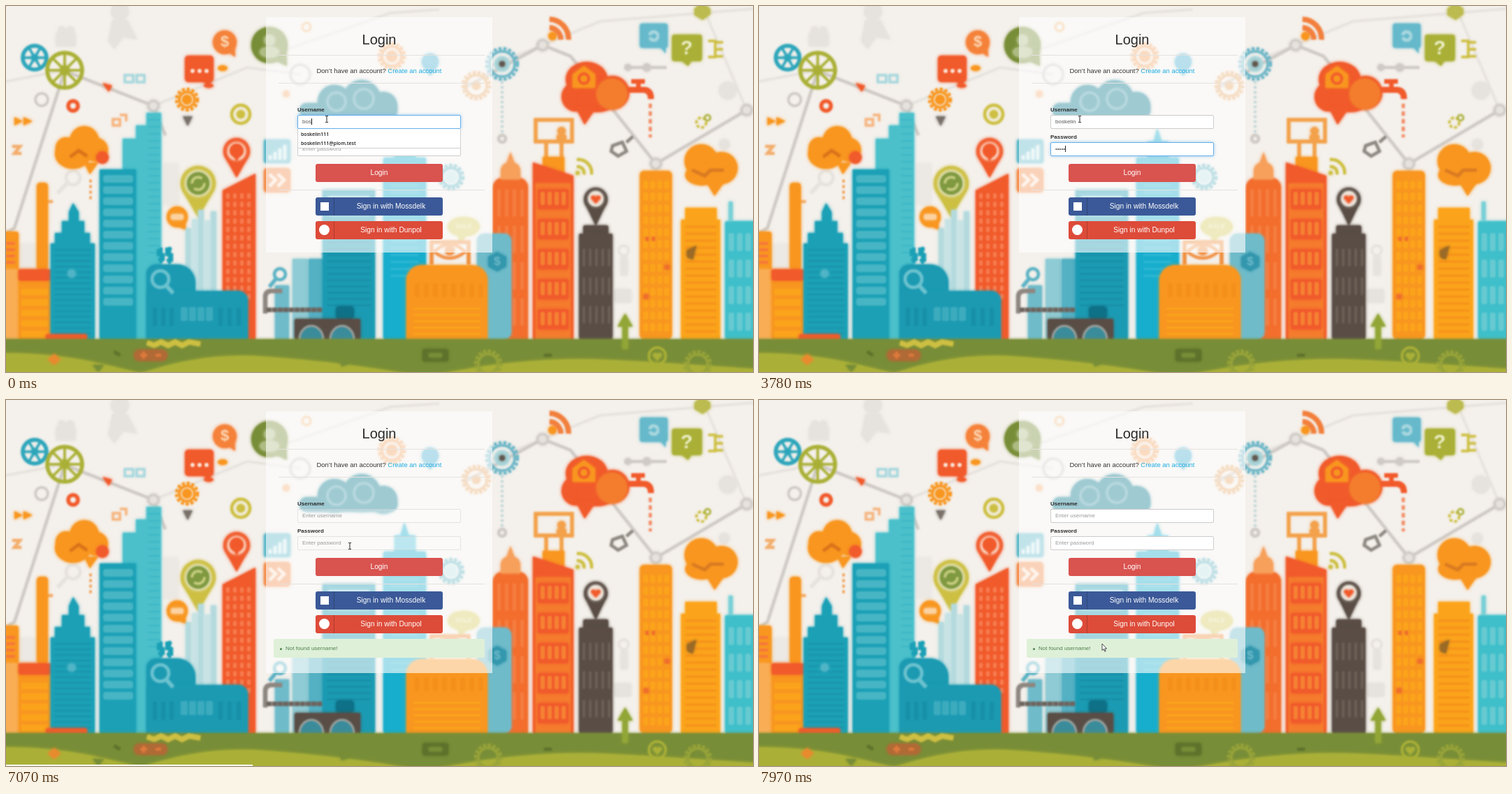
An HTML page with a canvas that plays this animation: 1069 px wide and 524 px high, repeating every 8000 ms.

```html
<!DOCTYPE html>
<html lang="en">
<head>
<meta charset="utf-8">
<title>Login</title>
<style>
  html, body { margin: 0; width: 100%; height: 100%; overflow: hidden; background: #f4f0eb; }
  body { position: relative; font: 8px/10px "Liberation Sans", Arial, sans-serif; color: #333; }
  body *, #city { box-sizing: border-box; }
  #city { position: absolute; left: -10px; top: -10px; filter: blur(1.2px); }
  .card, .card > *, #bar, #mouse { position: absolute; }
  .card { left: 372px; top: 16px; width: 324px; height: 337px; background: rgba(255,255,255,.61); white-space: nowrap; }
  .card.tall { height: 375px; }
  h1 { left: 0; right: 0; top: 20px; margin: 0; text-align: center; font: 20px/24px "Liberation Sans", Arial, sans-serif; color: #2b2b2b; }
  hr { left: 18px; width: 295px; height: 1px; margin: 0; border: 0; background: #e5e2df; }
  .join { left: 0; right: 0; top: 71px; text-align: center; font-size: 9.45px; line-height: 12px; }
  .join span { color: #1cabe2; }
  label { left: 45px; font-weight: bold; color: #2d2d2d; }
  .field { left: 45px; width: 234px; height: 20px; padding: 4px 6px; border: 1px solid #ccc; border-radius: 2px; background: #fff; color: #555; }
  .hint { color: #999; }
  .caret { display: inline-block; width: 0; height: 9px; margin-right: -1px; border-left: 1px solid #222; vertical-align: top; }
  .btn { left: 71px; width: 182px; height: 26px; border-radius: 3px; color: #fff; font-size: 10.25px; line-height: 25px; text-align: center; }
  .social { padding-left: 34px; }
  .social::before { content: ""; position: absolute; left: 0; top: 0; width: 26px; height: 26px; border-right: 1px solid rgba(0,0,0,.2); }
  .social i { position: absolute; left: 7px; top: 7px; width: 12px; height: 12px; background: #fff; }
  .social i.dot { left: 5px; top: 5px; width: 15px; height: 15px; border-radius: 50%; }
  #menu { left: 45px; top: 160px; width: 234px; height: 28px; padding: 1px 0 0 4px; background: #fff; border: 1px solid #d0d0d0; border-top: 0; font: 600 7px/13.3px "Open Sans", "Noto Sans", sans-serif; color: #1c1c1c; }
  #alert { left: 11px; top: 326px; width: 302px; height: 27px; border-radius: 2px; background: #dff0d8; color: #4d804e; line-height: 27px; padding-left: 17px; }
  #alert::before { content: ""; position: absolute; left: 9px; top: 13px; width: 3px; height: 3px; border-radius: 50%; background: #4d804e; }
  #bar { left: 0; top: 522px; width: 353px; height: 2px; background: #fdfdfd; }
  #mouse { left: 0; top: 0; width: 20px; height: 20px; overflow: visible; }
</style>
</head>
<body>
<canvas id="city" width="1089" height="544"></canvas>
<div class="card" id="card">
  <h1>Login</h1>
  <hr style="top:54px"><hr style="top:94px"><hr style="top:247px">
  <div class="join">Don’t have an account? <span>Create an account</span></div>
  <label style="top:128px">Username</label>
  <div class="field" id="user" style="top:140px"></div>
  <label style="top:167px">Password</label>
  <div class="field" id="pass" style="top:179px"></div>
  <div id="menu">boskelin111<br>boskelin111@plom.test</div>
  <div class="btn" style="top:210px;background:#d9534f">Login</div>
  <div class="btn social" id="blue" style="top:258px"><i></i>Sign in with Mossdelk</div>
  <div class="btn social" id="red" style="top:292px"><i class="dot"></i>Sign in with Dunpol</div>
  <div id="alert">Not found username!</div>
</div>
<div id="bar"></div>
<svg id="mouse">
  <path id="beam" d="M-2 -4.5H-.5L0 -4L.5 -4.5H2M0 -4V4M-2 4.5H-.5L0 4L.5 4.5H2" fill="none" stroke="#222"/>
  <path id="arrow" d="M0 0V9.5L2.2 7.5L3.7 11L5.2 10.4L3.7 7H6.6Z" fill="#fff" stroke="#222" stroke-width=".8"/>
  <path id="hand" d="M-1 1Q0 -1 1 1V4.5L5.5 5.5Q6.5 6 6 8L5 11.5H0L-3.2 7Q-3.5 5.5 -1 6.8Z" fill="#fff" stroke="#222" stroke-width=".8"/>
</svg>
<script>
const $ = id => document.getElementById(id);
const g = $('city').getContext('2d');
g.translate(10, 10);

// Drawing helpers; every shape gets a soft edge in its own colour.
const ink = (col, soft = 4) => { g.fillStyle = g.strokeStyle = g.shadowColor = col; g.shadowBlur = soft; };
const fill = (col, d) => { ink(col); g.fill(new Path2D(d)); };
const line = (col, w, d, dash = []) => { ink(col, 2); g.lineWidth = w; g.setLineDash(dash); g.stroke(new Path2D(d)); };
const box = (col, x, y, w, h, r = 1) => { ink(col); g.beginPath(); g.roundRect(x, y, w, h, r); g.fill(); };
const disc = (col, x, y, r, ry = r) => { ink(col); g.beginPath(); g.ellipse(x, y, r, ry, 0, 0, 7); g.fill(); };
const ring = (col, x, y, r, w = 3, dash = []) => { ink(col, 2); g.lineWidth = w; g.setLineDash(dash); g.beginPath(); g.arc(x, y, r, 0, 2 * Math.PI); g.stroke(); };
const gear = (col, x, y, r) => { ring(col, x, y, r, 4, [4, 3]); ring(col, x, y, r - 4, 3); };
const text = (col, x, y, size, s) => { ink(col, 0); g.font = `bold ${size}px "Liberation Sans", sans-serif`; g.textAlign = 'center'; g.textBaseline = 'middle'; g.fillText(s, x, y); };
const grid = (col, x, y, w, h, cols, rows, dx, dy, r = 1) => {
  ink(col, 0);
  for (let i = 0; i < cols * rows; i++) {
    g.beginPath(); g.roundRect(x + i % cols * dx, y + (i / cols | 0) * dy, w, h, r); g.fill();
  }
};
const pin = (col, x, y, r, tip) => { disc(col, x, y, r); fill(col, `M${x - r * .75} ${y + r * .65}L${x} ${tip}L${x + r * .75} ${y + r * .65}Z`); };
const wheel = (col, x, y, r, n) => {
  ring(col, x, y, r - 3, 5); disc(col, x, y, r / 4);
  for (let i = 0; i < n; i++) {
    const a = i / n * 2 * Math.PI;
    line(col, 3, `M${x} ${y}L${x + Math.cos(a) * (r - 3)} ${y + Math.sin(a) * (r - 3)}`);
  }
};

const teal = '#1ba0b6', aqua = '#4bc0cb', sky = '#6fbbca', orange = '#f8961f', amber = '#fba41b', red = '#f15a2b';
const gold = '#cdbf42', olive = '#aab037', leaf = '#788d37', brown = '#594d45', grey = '#cfcac5', mist = '#e6e2de';

function backdrop() {
  line(mist, 3, 'M211 143L345 88L421 98M768 56L850 22L1069 4M695 85L768 56M0 108L84 92M1060 149L1003 15M365 75L550 10L620 5');
  line(grey, 4, 'M0 325L12 318L84 93L211 143L228 185M654 118L768 56L808 72L930 226L1060 149');
  for (const [x, y] of [[211, 143], [768, 56], [930, 226], [1060, 149]]) { disc(grey, x, y, 9); disc(mist, x, y, 5); }
  box(mist, 71, 38, 29, 20, 3); disc(mist, 80, 35, 6); disc(mist, 92, 35, 6);
  disc(mist, 163, 8, 13); fill(mist, 'M152 20H174L188 48L168 45L155 62L146 50Z');
  ring(mist, 96, 246, 10, 4); line(mist, 5, 'M88 253L74 268');
  disc(mist, 1033, 121, 13); disc(mist, 1028, 198, 8);
  ring(mist, 884, 350, 7); box(mist, 879, 358, 11, 28, 3); box(mist, 870, 405, 25, 20, 4);
  box('#ece8e3', 225, 225, 22, 60); box('#ece8e3', 18, 340, 46, 36);
  ring(grey, 51, 134, 9, 3); ring(grey, 421, 98, 14, 3);
  line(grey, 4, 'M885 88H945'); disc(grey, 890, 88, 5); disc(grey, 917, 88, 6);
  line('#8f8983', 4, 'M868 200L882 195L888 208L876 215L866 208ZM888 195L897 187');
}

function icons() {
  wheel('#2fa6bb', 41, 74, 20, 6);
  wheel(olive, 84, 92, 28, 8);
  disc('#f5823a', 313, 52, 17); fill('#f5823a', 'M318 66L328 73L327 56Z'); text('#fbd9b8', 313, 52, 22, '$');
  box(red, 256, 71, 41, 38, 5); fill(red, 'M280 106L292 117L293 105Z'); grid('#fbe3d5', 264, 90, 6, 6, 3, 1, 10, 0, 3);
  disc(orange, 310, 89, 7, 4); disc(red, 290, 114, 7, 3);
  gear(orange, 259, 134, 15); disc(orange, 259, 134, 7);
  line('#a8d8de', 3, 'M170 99H182V109H170ZM187 99H198V109H187Z');
  ring(red, 96, 143, 7, 5); fill(red, 'M138 110L152 114L147 123Z');
  fill(orange, 'M12 159L24 165L12 171ZM25 159L38 165L25 171Z');
  line('#f6b580', 3, 'M153 162H163V171H153ZM163 156H172V165');
  ring(gold, 336, 155, 13, 4); disc(gold, 336, 155, 6);
  fill('#7a716b', 'M253 158H267L260 172Z');
  disc(leaf, 377, 56, 26); fill(leaf, 'M385 78L402 86L401 60Z'); disc('#aebc84', 377, 49, 8); disc('#aebc84', 377, 66, 14, 8);
  disc(orange, 96, 212, 26, 21); disc(orange, 112, 193, 21); disc(orange, 129, 206, 17); disc(orange, 86, 203, 15);
  fill(orange, 'M112 225L120 241L132 224Z'); disc(red, 138, 217, 9);
  line('#d9731b', 4, 'M92 216L104 207L116 215'); grid('#f2a55c', 119, 248, 4, 5, 1, 4, 0, 8, 2);
  pin(red, 330, 208, 19, 246); disc('#fbe2d2', 330, 208, 13); disc(red, 330, 207, 10); fill(red, 'M324 210H336L330 223Z');
  pin(gold, 275, 254, 25, 303); disc('#efe9bd', 275, 254, 19); disc('#7f9940', 275, 254, 16); ring('#c9cf82', 275, 254, 9, 3, [20, 8]);
  disc(orange, 245, 302, 15); fill(orange, 'M247 316L258 321L256 307Z'); box('#fbd2a0', 236, 298, 18, 8, 3);
  line('#f3ae6c', 4, 'M9 201H20L12 211H22M60 280H67');
  box('#5bb7c8', 369, 191, 38, 34, 4);
  for (let i = 0; i < 4; i++) box('#d6eef0', 376 + i * 7, 214 - i * 5, 4, 6 + i * 5);
  box('#f28c4a', 369, 232, 38, 35, 5); line('#fde5d3', 4, 'M377 241L386 249L377 258M389 241L398 249L389 258');
  gear('#f2a15c', 552, 72, 18); disc('#f2a15c', 552, 72, 8);
  pin('#4aafd0', 607, 80, 12, 100); ring('#f0c08a', 430, 30, 6, 3); disc('#f5b27b', 401, 126, 5);
  const cloud = '#08788c';
  disc(cloud, 470, 137, 24); disc(cloud, 509, 133, 27); disc(cloud, 540, 143, 20); box(cloud, 420, 139, 140, 21, 10);
  ring('#4a9eac', 473, 137, 13); ring('#4a9eac', 512, 133, 14);
  gear('#e8a765', 673, 114, 19); disc('#e8a765', 673, 114, 6);
  gear('#55aebd', 637, 245, 17); disc('#bfe2e6', 637, 245, 9);
  disc('#d6ca5d', 655, 316, 23, 14); fill('#d6ca5d', 'M646 327L650 340L660 328Z'); text('#ece7b8', 655, 316, 9, 'SALE');
  gear('#6bb5c6', 710, 83, 22); disc('#a9d5da', 710, 83, 11); disc('#61584f', 710, 83, 4);
  line('#b9d3d6', 3, 'M710 108V182', [3, 4]); ring(grey, 710, 190, 5, 4);
  disc(orange, 782, 43, 6); line('#f27f3c', 7, 'M778 31A17 17 0 0 1 794 48M778 19A28 28 0 0 1 805 48');
  box('#66b9cb', 907, 25, 40, 35, 4); fill('#66b9cb', 'M935 57L944 68V55Z'); ring('#a9d7df', 927, 43, 6, 4, [16, 4]);
  box(olive, 953, 41, 43, 38, 4); fill(olive, 'M964 76L976 86L982 77Z'); text('#eef0cb', 974, 61, 28, '?');
  fill('#bcbb50', 'M985 4L996 -6L1008 4V12L997 20L985 13Z');
  line(gold, 3, 'M1005 50H1015V73H1005M1015 62H1026M1015 52H1026M1015 72H1026');
  disc(red, 831, 105, 30, 25); disc(red, 868, 124, 24); disc(red, 815, 130, 20, 21); disc(red, 846, 134, 28, 18);
  fill(red, 'M815 145L828 170L845 145Z'); disc('#f37d2c', 867, 126, 22);
  fill(orange, 'M827 86L843 98V117H811V98Z'); ring(red, 827, 104, 7, 3);
  line(red, 8, 'M890 120H912Q923 120 923 133'); line(red, 6, 'M895 108H914M905 108V120'); line('#f28c64', 4, 'M922 140V188', [6, 5]);
  ring(gold, 995, 167, 7, 3, [4, 3]); ring(olive, 1004, 160, 4, 2);
  disc(gold, 818, 239, 3); line(gold, 4, 'M817 230A9 9 0 0 1 827 241M817 220A19 19 0 0 1 838 241');
  disc(orange, 995, 222, 24); disc(orange, 1024, 232, 23); disc(orange, 996, 242, 24, 15);
  fill(orange, 'M1002 252L1014 272L1028 252Z'); line('#d97a22', 4, 'M982 235L1000 243L1008 235H1027');
}

function leftTown() {
  box(orange, -12, 323, 30, 154, 4); box('#f9ae55', -12, 377, 30, 100);
  grid('#f7773a', 0, 338, 13, 4, 1, 4, 0, 9);
  box(orange, 44, 253, 16, 125, 5); box(orange, 18, 377, 46, 100); box(red, 18, 377, 46, 16, 3);
  grid(amber, 22, 405, 38, 9, 1, 5, 0, 15);
  fill(teal, 'M64 477V340H70V325H80V308H90V295L96 282L104 295V308H112V325H120V340H127V477Z');
  grid('#1993aa', 69, 348, 53, 2, 1, 16, 0, 8); disc('#4fb4c5', 94, 383, 6);
  fill(aqua, 'M167 477V190H186V171H201V153H222V477Z'); grid('#3cb6c4', 203, 162, 17, 2, 1, 20, 0, 10);
  box(teal, 134, 234, 52, 243); grid('#47b5c4', 139, 242, 43, 11, 1, 12, 0, 16, 4);
  for (let i = 0; i < 5; i++) box(i % 2 ? '#c8e3e4' : '#b4dade', 257 + i * 9, 318 - (i * 13) % 28, 8, 170);
  fill(red, 'M310 264L357 240V477H310Z'); grid('#f67d50', 315, 268, 5, 8, 4, 13, 10, 12, 2);
  line(teal, 4, 'M224 350H218V356H225V363H218M237 348H230V356H237V364H230M222 346V368M234 345V369');
  box('#1b9ab2', 201, 370, 70, 108, [14, 26, 0, 0]); box('#1b9ab2', 203, 408, 143, 70, [4, 14, 0, 0]);
  ring('#6cc2cf', 221, 391, 12, 4); line('#6cc2cf', 5, 'M229 400L239 411');
  grid('#3dabbe', 250, 431, 10, 20, 4, 1, 12, 0, 2); grid('#178fa8', 210, 432, 6, 26, 3, 1, 12, 0); grid('#178fa8', 304, 432, 6, 26, 3, 1, 13, 0);
  box(red, 57, 470, 59, 8, 3);
}

function midTown() {
  box('#8fcbd4', 410, 362, 22, 115); box(sky, 385, 400, 20, 77); box('#54b0c3', 433, 362, 20, 115);
  ring('#5db3c4', 392, 384, 8, 4); line('#5db3c4', 5, 'M386 391L377 402'); line('#8e8680', 6, 'M371 440V417Q371 408 380 408H395');
  box('#1b9bb3', 453, 263, 75, 214); box('#bde3e8', 460, 273, 61, 26, 3);
  grid('#1890a9', 459, 310, 63, 3, 1, 14, 0, 9);
  box('#17adcd', 540, 217, 61, 260, 3); box('#17adcd', 556, 194, 30, 28); fill('#17adcd', 'M564 196L570 175L577 196Z');
  grid('#2db7d2', 550, 225, 40, 3, 1, 17, 0, 10);
  line('#6d645e', 6, 'M373 435H452', [7, 1]); box('#0e7187', 472, 430, 26, 18, 5);
  box(brown, 413, 448, 94, 29, 2);
  for (const x of [437, 481]) { const arch = `M${x - 17} 477a17 19 0 0 1 34 0`; fill('#3a8c9b', arch); line('#a9a39c', 2, arch); }
  line('#ef8f3f', 5, 'M609 352V338H662V370M609 350V370'); line('#f2944b', 4, 'M613 352Q635 330 657 352Q635 370 613 352');
  disc('#f2944b', 635, 350, 7);
}

function rightTown() {
  box('#f36d2c', 697, 246, 50, 231, [14, 14, 0, 0]); box('#f6a05c', 708, 224, 28, 24, [12, 12, 0, 0]); fill('#f6a05c', 'M716 226L722 209L728 226Z');
  grid('#f57d40', 703, 262, 5, 40, 4, 4, 11, 52, 2);
  box(sky, 674, 326, 49, 151, 10); fill('#3397ad', 'M703 352L716 359V373L703 380L690 373V359Z'); text(sky, 703, 366, 17, '$');
  box(orange, 573, 371, 116, 107, [22, 22, 0, 0]); grid('#f58f1b', 585, 397, 7, 20, 8, 1, 13, 0, 3); grid(amber, 583, 432, 96, 3, 1, 5, 0, 9);
  line('#f3a14b', 5, 'M758 163H810V194H758ZM773 196V222M795 196V222'); disc('#f3a14b', 795, 179, 6); box('#f3a14b', 788, 184, 14, 9, 3);
  box(orange, 768, 216, 31, 30); fill(red, 'M754 224L812 243V477H754Z'); fill('#f57b2d', 'M758 254H808V477H758Z');
  for (let y = 262; y < 470; y += 43) { box(red, 761, y, 44, 29, 3); grid('#f58233', 765, y + 4, 6, 19, 4, 1, 10, 0, 2); }
  pin(brown, 844, 277, 17, 315); disc('#eee8df', 844, 276, 11); fill(red, 'M844 283L837 275Q838 269 844 273Q850 269 851 275Z');
  box(brown, 826, 314, 36, 16, 3); box(brown, 820, 326, 48, 151, 2);
  grid('#6a5e55', 825, 347, 4, 26, 5, 3, 9, 41, 2);
  box(orange, 907, 236, 46, 241, 6); grid(amber, 912, 250, 7, 12, 4, 13, 10, 17, 3);
  grid('#ef6f2c', 915, 330, 5, 7, 2, 1, 9, 0, 2); disc('#ef6f2c', 946, 374, 4); disc('#ef6f2c', 916, 416, 4);
  fill(amber, 'M966 477V306H972V289H1017V306H1022V477Z'); grid('#f7951a', 972, 314, 45, 4, 1, 16, 0, 10);
  fill('#9b6a26', 'M974 350L988 343L983 363L975 360Z');
  box('#3fbfca', 1029, 308, 50, 169, 3); grid('#68cad1', 1034, 325, 8, 26, 4, 4, 12, 38, 3); box('#79d0d6', 1034, 280, 6, 28);
}

function ground() {
  box(leaf, -12, 477, 1100, 60, 0);
  fill(olive, 'M-12 497Q70 496 140 513T240 536H-12Z');
  fill(olive, 'M170 534C240 508 300 497 370 502S540 518 610 534Z');
  fill(olive, 'M590 534C700 508 790 503 870 507S1010 516 1080 520V536H590Z');
  line(gold, 7, 'M202 482L212 486L222 481L232 486L242 481L252 486L262 481L278 484');
  box('#b06a35', 183, 492, 48, 16, 8); line('#df7a3c', 3, 'M192 500H202M197 495V505M214 500H222');
  fill('#e88b2e', 'M69 498L78 506L69 514L60 506Z'); box('#5f722c', 596, 491, 37, 18, 4); box(leaf, 605, 497, 19, 6, 2);
  gear('#98a43a', 690, 512, 18); gear('#98a43a', 990, 513, 18); ring(olive, 932, 501, 12, 3); fill(olive, 'M932 508L925 500Q928 494 932 498Q937 494 939 500Z');
  fill(leaf, 'M124 514H140L132 524ZM478 506L492 512L480 516Z'); line('#5f722c', 4, 'M155 495L163 500M770 500H781');
  fill('#92a637', 'M886 440L897 459H890V491H882V459H875Z');
}

[backdrop, icons, leftTown, midTown, rightTown, ground].forEach(draw => draw());

// Timeline
const LOOP = 8000, RELOAD = 7070, NAME = 'boskelin';
const typed = [120, 210, 310, 410, 510], dotted = [2570, 2820, 3000, 3250, 3780, 4080, 4330];
const route = [[0, 458.5, 162], [6410, 458.5, 162], [7070, 492, 209], [7220, 492, 209], [7670, 486.5, 237], [8000, 491, 360]];
const past = (list, t) => list.filter(s => s <= t).length;
const clamp = v => Math.max(0, Math.min(1, v));
const CARET = '<span class="caret"></span>';

function setField(el, value, hint, caret, focus, solid) {
  const html = (value ? '' : caret ? CARET : '') + (value || `<span class="hint">${hint}</span>`) + (value && caret ? CARET : '');
  if (el.shown !== html) el.innerHTML = el.shown = html;
  const mix = (a, b) => a + (b - a) * focus;
  el.style.borderColor = `rgba(${mix(204, 102)},${mix(204, 175)},${mix(204, 233)},${.5 + .5 * solid})`;
  el.style.background = `rgba(255,255,255,${.25 + .75 * solid})`;
  el.style.boxShadow = `0 0 5px rgba(102,175,233,${.6 * focus})`;
}

function pointer(t) {
  const i = Math.max(1, route.findIndex(p => p[0] > t));
  const [t0, x0, y0] = route[i - 1], [t1, x1, y1] = route[i];
  const k = (t - t0) / (t1 - t0);
  return [x0 + (x1 - x0) * k, y0 + (y1 - y0) * k];
}

function render(t) {
  const loaded = t >= RELOAD, solid = loaded ? clamp((t - RELOAD) / 100) : 1;
  const moved = loaded ? 0 : clamp((t - 1210) / 150);
  const userCaret = t < 1010, passCaret = (t >= 1260 && t < 1960) || (t >= 2450 && t < 4830);
  setField($('user'), loaded ? '' : NAME.slice(0, 3 + past(typed, t)), 'Enter username', userCaret, loaded ? 0 : 1 - moved, solid);
  setField($('pass'), loaded ? '' : '•'.repeat(past(dotted, t)), 'Enter password', passCaret, moved, solid);
  $('menu').hidden = t >= 1260;
  $('alert').hidden = !loaded;
  $('card').classList.toggle('tall', loaded);
  $('bar').hidden = t < 5850 || t >= 7220;

  const [x, y] = pointer(t), on = (a, b) => y >= a && y <= b;
  const overBlue = on(274, 300), overRed = on(308, 334);
  const waiting = t >= 5010 && t < 6470;
  const kind = waiting ? 'arrow' : on(156, 176) || on(195, 215) ? 'beam' : on(226, 252) || overBlue || overRed ? 'hand' : 'arrow';
  for (const id of ['beam', 'arrow', 'hand']) $(id).style.display = id === kind ? '' : 'none';
  $('mouse').style.transform = `translate(${Math.round(x)}px,${Math.round(y)}px)`;
  $('blue').style.background = overBlue ? '#2d4373' : '#3b5998';
  $('red').style.background = overRed ? '#c23321' : '#dd4b39';
}

const start = performance.now();
(function tick() {
  render((performance.now() - start) % LOOP);
  requestAnimationFrame(tick);
})();
</script>
</body>
</html>
```
